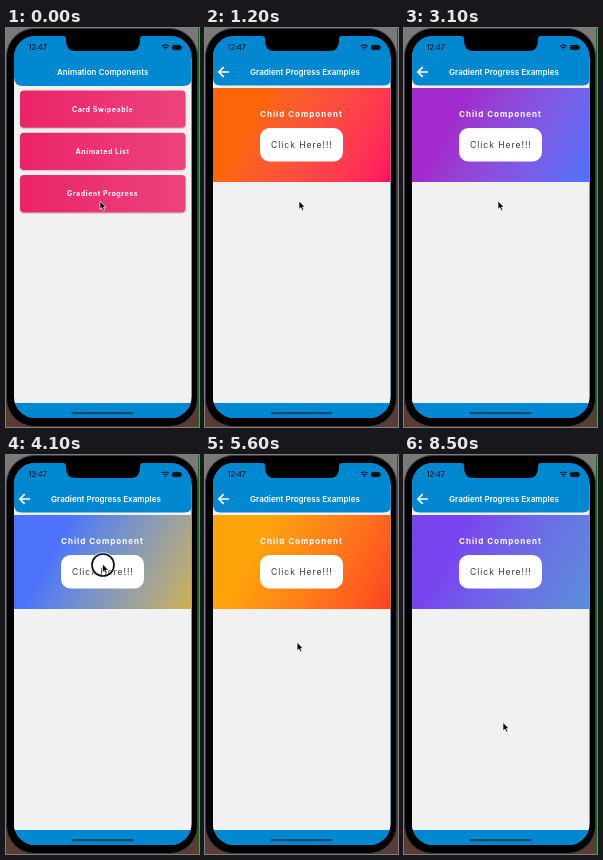
An HTML page for the animation above (8.6 s loop, 193 by 399 pixels).

```html
<!DOCTYPE html>
<html lang="en">
<head>
<meta charset="utf-8">
<title>Animation components</title>
<style>
  html, body { margin: 0; width: 100%; height: 100%; overflow: hidden; background: #000; }
  svg { display: block; width: 100vw; height: 100vh; }
  text { font-family: Inter, sans-serif; fill: #fff; white-space: pre; }
  .title { font-size: 8.05px; font-weight: 600; }
  .label { font-size: 7px; font-weight: 700; letter-spacing: .55px; }
</style>
</head>
<body>
<svg viewBox="0 0 193 399" preserveAspectRatio="none">
  <defs>
    <clipPath id="screenClip"><rect x="8" y="8" width="177.5" height="382" rx="21"/></clipPath>
    <linearGradient id="pink"><stop stop-color="#ec236a"/><stop offset="1" stop-color="#ec437d"/></linearGradient>
    <linearGradient id="blend" gradientUnits="userSpaceOnUse" x1="8" y1="60" x2="185" y2="154">
      <stop id="from" offset=".25"/><stop id="to" offset="1"/>
    </linearGradient>
  </defs>

  <!-- desk and phone body -->
  <rect width="193" height="399" fill="#7b7977"/>
  <rect y="370" width="193" height="29" fill="#593c33"/>
  <rect x=".5" y=".5" width="191" height="398" rx="28" fill="#000" stroke="#3b3b3d"/>
  <rect x="192" width="1" height="399" fill="#1b6420"/>

  <g clip-path="url(#screenClip)">
    <rect x="8" y="8" width="178" height="382" fill="#0288d1"/>
    <g id="home">
      <rect x="8" y="30" width="178" height="345" fill="#f1f1f1"/>
      <path d="M8 8H186V49q0 9-9 9H17q-9 0-9-9Z" fill="#0288d1"/>
      <text class="title" x="51" y="47">Animation Components</text>
      <g id="buttons"></g>
    </g>
    <g id="detail">
      <rect x="8" y="30" width="178" height="345" fill="#f1f1f1"/>
      <path d="M8 8H186V50q0 7.5-7.5 7.5H15.5q-7.5 0-7.5-7.5Z" fill="#0288d1"/>
      <path d="M24 44H14M18.7 39.2 13.9 44l4.8 4.8" fill="none" stroke="#fff" stroke-width="1.7"/>
      <text class="title" x="45" y="47">Gradient Progress Examples</text>
      <rect x="8" y="60" width="178" height="94" fill="url(#blend)"/>
      <text x="55" y="89" font-size="8" font-weight="700" letter-spacing="1">Child Component</text>
      <rect x="55" y="100" width="83" height="33.5" rx="9.5" fill="#fff"/>
      <text x="66" y="120.2" font-size="8.6" letter-spacing=".95" style="fill:#3a3a3a">Click Here!!!</text>
    </g>
    <rect x="8" y="375" width="178" height="15" fill="#0288d1"/>
    <rect x="65.5" y="384" width="62" height="2.2" rx="1.1" fill="#0a4a70"/>

    <!-- status bar -->
    <path d="M57 8q3 0 3 3v2q0 10 10 10h54q10 0 10-10v-2q0-3 3-3Z" fill="#000"/>
    <text x="22.5" y="22" font-size="7.2" font-weight="500" style="fill:#06121a">12:47</text>
    <g fill="none" stroke="#06121a">
      <path d="M155.8 18.3q3.5-2.6 7 0M157.3 20q2-1.500 4 0" stroke-width="1.2"/>
      <circle cx="159.3" cy="21.5" r=".4"/>
      <rect x="166.3" y="17.3" width="8.6" height="4.4" rx="1.2" fill="#06121a" stroke-width=".6"/>
      <path d="M176 18.6v1.8" stroke-width=".7"/>
    </g>
  </g>

  <g id="cursor">
    <g id="ring" fill="none">
      <circle cx=".5" cy="1" r="11" stroke="#fff" stroke-width="3.4" stroke-opacity=".65"/>
      <circle cx=".5" cy="1" r="11" stroke="#111" stroke-width="1.7"/>
    </g>
    <path d="M0 0V8.3L1.9 6.6 3.3 9.6 4.8 8.9 3.5 6.1H6Z" fill="#000" stroke="#fff" stroke-width=".7"/>
  </g>
</svg>
<script>
const LOOP = 8600;
const COLOR_TIME = 1000;
const COLOR_START = 350;
const palette = ['#ffbe0b', '#fb5607', '#ff006e', '#8338ec', '#3a86ff'];
const pointerHome = { x: 94, y: 173 };
const pointerMoves = [
  { start: 3300, end: 3800, x: 96.5, y: 109 },
  { start: 5100, end: 5800, x: 91, y: 206.5 },
  { start: 7300, end: 8100, x: 99, y: 267.5 }
];

const $ = id => document.getElementById(id);
const progress = (t, start, end) => Math.min(1, Math.max(0, (t - start) / (end - start)));
const smooth = p => p * p * (3 - 2 * p);
const easeOut = p => 1 - (1 - p) ** 3;
const during = (t, start, end) => t >= start && t < end;

$('buttons').innerHTML = [['Card Swipeable', 66], ['Animated List', 69.5], ['Gradient Progress', 61]]
  .map(([label, x], i) => {
    const y = 62.5 + i * 42.3;
    return `<rect x="13.5" y="${y + .8}" width="166.5" height="38" rx="4.5" fill="#000" opacity=".13"/>
      <rect x="14" y="${y}" width="165.5" height="37.3" rx="4" fill="url(#pink)"/>
      <text class="label" x="${x}" y="${y + 21.3}">${label}</text>`;
  }).join('');

// Colour at a fractional position on the endlessly repeating palette.
function paletteColor(phase) {
  const n = palette.length;
  const wrapped = (phase + n) % n;
  const i = Math.floor(wrapped);
  const share = (wrapped - i) * 100;
  return `color-mix(in srgb, ${palette[(i + 1) % n]} ${share}%, ${palette[i]})`;
}

function pointerAt(t) {
  let { x, y } = pointerHome;
  for (const move of pointerMoves) {
    const p = smooth(progress(t, move.start, move.end));
    x += (move.x - x) * p;
    y += (move.y - y) * p;
  }
  return `translate(${x} ${y})`;
}

function draw(t) {
  const push = easeOut(progress(t, 500, 950));
  const phase = (t - COLOR_START) / COLOR_TIME;
  $('home').setAttribute('transform', `translate(${-53 * push})`);
  $('detail').setAttribute('transform', `translate(${178 * (1 - push)})`);
  $('from').style.stopColor = paletteColor(phase);
  $('to').style.stopColor = paletteColor(phase + 1);
  $('cursor').setAttribute('transform', pointerAt(t));
  const pressed = during(t, 200, 500) || during(t, 3950, 4300);
  $('ring').setAttribute('visibility', pressed ? 'visible' : 'hidden');
}

const began = performance.now();
function tick() {
  draw((performance.now() - began) % LOOP);
  requestAnimationFrame(tick);
}
tick();
</script>
</body>
</html>
```
